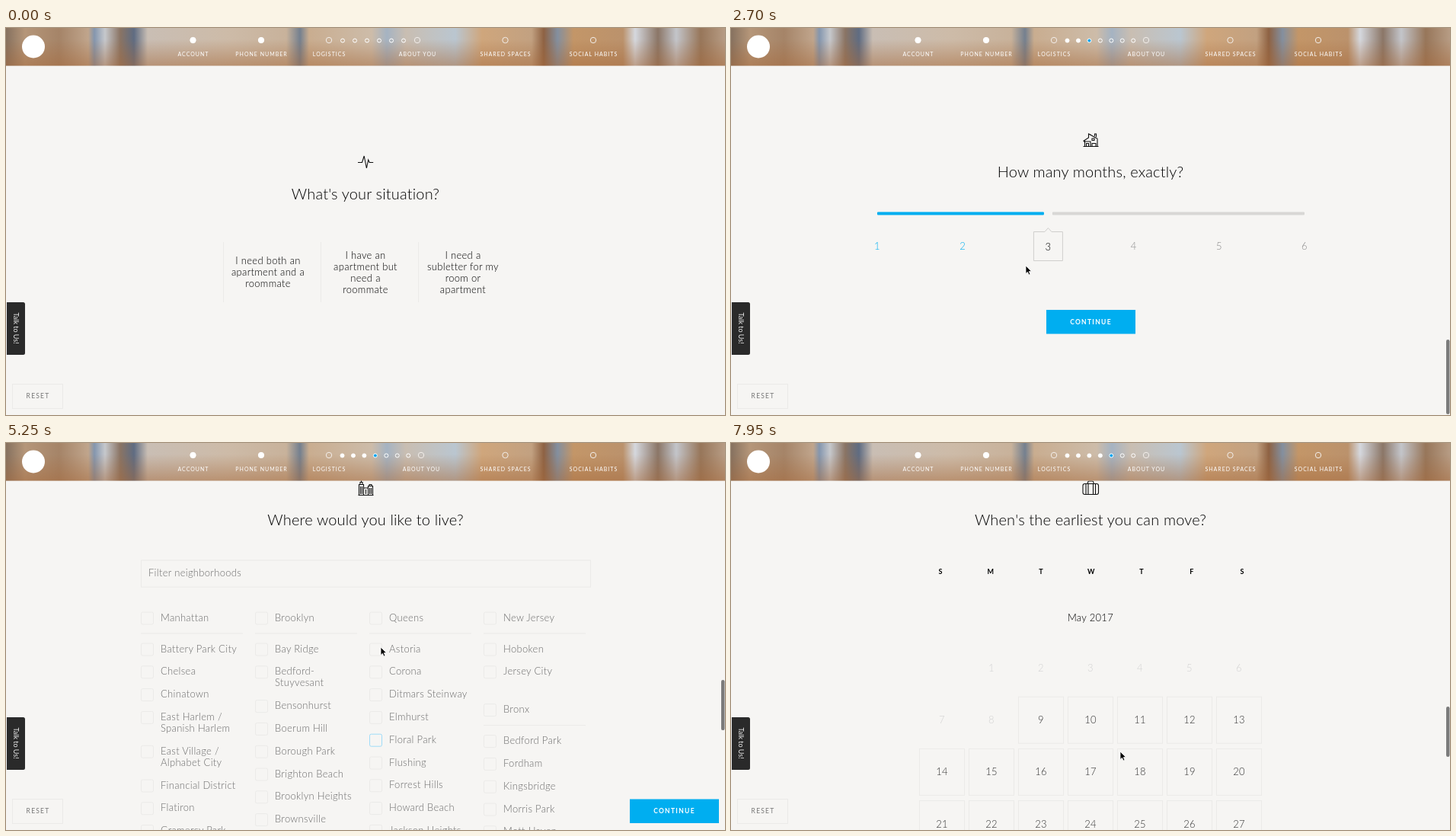
Recreate the animation shown at these times as an HTML page. Size 944x508 px, loop 8 s.

```html
<!DOCTYPE html>
<html lang="en">
<head>
<meta charset="utf-8">
<title>Roommate questionnaire</title>
<style>
  html, body { margin: 0; width: 100%; height: 100%; overflow: hidden; background: #f6f5f3; }
  svg { display: block; width: 944px; height: 508px; }
  text { font: 300 13px Lato, "Open Sans", sans-serif; letter-spacing: .3px; white-space: pre; }
  .mid { text-anchor: middle; }
  .title { font-size: 20px; letter-spacing: .15px; }
  .grey { fill: #6c6c6c; }
  .nav { font-size: 7px; font-weight: 400; letter-spacing: 1px; fill: #fff; }
  .caps { font-size: 8.5px; font-weight: 400; letter-spacing: 1.2px; fill: #777; }
  .btn { font-size: 8.5px; font-weight: 700; letter-spacing: 1.3px; fill: #fff; }
  .week { font-size: 9px; font-weight: 700; }
  .tab { font-size: 9px; font-weight: 400; letter-spacing: 0; fill: #eee; }
  .icon { fill: none; stroke: #111; stroke-width: 1.1; }
</style>
</head>
<body>
<svg id="stage" viewBox="0 0 944 508"></svg>
<script>
const LOOP = 8000, STEP = 150;
const BLUE = '#00aef0', HOVER = '#1cb8fb', LINE = '#ebeae8', PAPER = '#f6f5f3';

const text = (x, y, s, cls = '', extra = '') => `<text x="${x}" y="${y}" class="${cls}" ${extra}>${s}</text>`;
const rect = (x, y, w, h, fill, extra = '') => `<rect x="${x}" y="${y}" width="${w}" height="${h}" fill="${fill}" ${extra}/>`;
const box = (x, y, w, h, stroke = LINE, extra = '') => rect(x + .5, y + .5, w, h, 'none', `stroke="${stroke}" ${extra}`);
const path = (d, extra) => `<path d="${d}" ${extra}/>`;
const circle = (x, y, r, fill, stroke) => `<circle cx="${x}" cy="${y}" r="${r}" fill="${fill}" stroke="${stroke}"/>`;
const list = (n, f) => Array.from({ length: n }, (_, i) => f(i)).join('');
const group = (y, s) => `<g transform="translate(0 ${y.toFixed(1)})">${s}</g>`;

// Eased value between keys of the form [time, ...values]
function at(t, keys) {
  const i = keys.findIndex(k => k[0] > t);
  if (i < 0) return keys.at(-1).slice(1);
  if (!i) return keys[0].slice(1);
  const a = keys[i - 1], b = keys[i], u = (t - a[0]) / (b[0] - a[0]), e = u * u * (3 - 2 * u);
  return a.slice(1).map((v, j) => v + (b[j + 1] - v) * e);
}

const scrollKeys = [[750, -176], [1350, -109], [1800, 72], [1950, 72], [2550, 397], [4350, 397],
  [5100, 757], [5700, 757], [6000, 696], [7500, 696], [7950, 1029]];
const cursorKeys = [[300, 300, 420], [600, 348, 322], [1500, 348, 322], [1800, 387, 312], [2700, 387, 312],
  [3000, 416, 243], [3150, 416, 243], [3750, 641, 243], [4200, 459, 391], [4500, 459, 391], [4950, 486, 388],
  [5100, 486, 388], [5250, 492, 268], [5700, 425, 172], [6600, 425, 172], [6900, 335, 291], [7050, 335, 291],
  [7350, 877, 480], [7500, 877, 480], [7950, 511, 405]];
const thumbKeys = [[1500, 380, 127], [2550, 409, 98], [4350, 409, 98], [4500, 290, 66], [5100, 311, 66],
  [7500, 320, 66], [7950, 346, 66]];
const answerTimes = [900, 2100, 4500, 7650];

const icons = [
  'M462 .5h5.5l2.7-8.5 3.2 16 2.3-11 1.5 3.5h5',
  'M465-9.5h14M465 9.5h14M467-9.5v4q0 3 4 5.500q-4 2.500-4 5.500v4M477-9.500v4q0 3-4 5.500q4 2.500 4 5.500v4M468-3.500h8M468 6l4-3.500 4 3.500',
  'M462.500 1.500l7-4.500v-5l12 6.500M469.500-8l3.500 1.500M479.500-4v-4h-2v3M464.500 1v7.500h16.500v-9.500M462.500 8.500h20M463 2h9v6M466.500 8.500v-4h3v4M473.500 4.500h6M474 8v-3M479 8v-3M474-2h3v2.500h-3z',
  'M463.500 9.500v-14h6v14M465-4.500v-3h3v3M466.500-7.500v-2.500M469.500 0h6v9.500M475.500 9.500v-12h6v12M477-2.500v-2h3v2M462.500 9.500h20M465.500-2v10M467.500-2v10M472.500 2v6M477.500 0v8M479.500 0v8',
  'M464.500-5.500h15.500q2.500 0 2.500 2.500v9q0 2.500-2.500 2.500h-15.500q-2.500 0-2.500-2.500v-9q0-2.500 2.500-2.500zM468.500-5.500v-1.500q0-2 2-2h3.500q2 0 2 2v1.500M466 8v-13.500M469 8v-13.500M475.500 8v-13.500M478.500 8v-13.500'
];
const questions = ["What's your situation?", 'For how long?', 'How many months, exactly?',
  'Where would you like to live?', "When's the earliest you can move?"];
const answers = [['Your situation', 'I need both an apartment and a roommate'], ['How long', 'Short term'],
  ['How many months', '5 months'], ['Neighborhoods', 'Prospect Heights']];

const choices = [
  ['I need both an', 'apartment and a', 'roommate'],
  ['I have an', 'apartment but', 'need a', 'roommate'],
  ['I need a', 'subletter for my', 'room or', 'apartment']
];
// "#" marks a heading, "/" a line break
const areas = [
  '#Manhattan|Battery Park City|Chelsea|Chinatown|East Harlem //Spanish Harlem|East Village //Alphabet City|Financial District|Flatiron|Gramercy Park',
  '#Brooklyn|Bay Ridge|Bedford-/Stuyvesant|Bensonhurst|Boerum Hill|Borough Park|Brighton Beach|Brooklyn Heights|Brownsville',
  '#Queens|Astoria|Corona|Ditmars Steinway|Elmhurst|Floral Park|Flushing|Forrest Hills|Howard Beach|Jackson Heights',
  '#New Jersey|Hoboken|Jersey City|#Bronx|Bedford Park|Fordham|Kingsbridge|Morris Park|Mott Haven'
];

function checkbox(x, y, label, stroke = LINE, ticked = false) {
  const lines = label.includes('//') ? label.replace('//', '/|').split('|') : label.split(/(?<=-)\//);
  return box(x, y - 8, 16, 16, stroke, 'rx="2"') +
    (ticked ? rect(x, y - 8, 17, 17, BLUE, 'rx="2"') + path(`M${x + 4.5} ${y}l3 3 5-6`, 'fill="none" stroke="#fff" stroke-width="1.5"') : '') +
    lines.map((s, i) => text(x + 26, y + 4 + 15 * i, s, 'grey')).join('');
}

function areaColumn(spec, col, t) {
  const x = 177 + 150 * col;
  let y = 170.500, s = '';
  for (const name of spec.split('|')) {
    if (name[0] === '#') {
      if (s) y += 20;
      s += checkbox(x, y, name.slice(1)) + rect(x, y + 20, 134, 1, LINE);
      y += 41;
    } else {
      const lit = name === 'Floral Park' && t >= 5100 && t < 5400;
      s += checkbox(x, y, name, lit ? '#9fdcf8' : LINE);
      y += name.includes('/') ? 44.800 : 29.800;
    }
  }
  return s;
}

const button = (x, y, hot) => rect(x, y, 117, 31.500, hot ? HOVER : BLUE) + text(x + 58.500, y + 18.500, 'CONTINUE', 'btn mid');

const situation = () => choices.map((lines, c) => {
  const x = 344 + 128 * c;
  return rect(x - 59, 105, 1, 79, LINE) +
    lines.map((s, i) => text(x, 149 + 15 * i - 7.500 * (lines.length - 1), s, 'mid')).join('');
}).join('');

const duration = () => ['Short term', 'Long term'].map((s, i) =>
  box(334 + 144 * i, 105, 133, 34) + text(401 + 143 * i, 126, s, 'mid')).join('');

function months(t) {
  const [v] = at(t, [[3150, 3], [3750, 5]]);
  const x = 192 + 112.200 * (v - 1), now = Math.round(v);
  const numbers = list(6, i => i + 1 === now ? '' :
    text(192 + 112.200 * i, 143.500, i + 1, 'mid', `fill="${i + 1 < now ? BLUE : '#888'}"`));
  return rect(192, 94.500, x - 197.500, 4, BLUE, 'rx="1"') + rect(x + 5.500, 94.500, 747.500 - x, 4, '#d8d7d5', 'rx="1"') + numbers +
    path(`M${x - 19} 120.500h14.500l4.500-5 4.500 5h14.500v38h-38z`, `fill="${PAPER}" stroke="#cfcecc"`) +
    text(x, 145, now, 'mid') + button(414, 223, t >= 4200);
}

function places(t) {
  const focus = t >= 5700 && t < 7050, typed = t >= 6000 ? 'Pr' : t >= 5850 ? 'P' : '';
  const field = box(177, 94.500, 590, 35, focus ? '#45b8e8' : LINE) +
    (typed ? text(187, 117, typed) : text(187, 116, 'Filter neighborhoods', 'grey')) +
    (focus ? rect(typed ? 184 + 7.500 * typed.length : 187, 105, 1, 14, '#333') : '');
  return field + (typed
    ? checkbox(327, 171, 'Prospect Heights', LINE, t >= 7050) + checkbox(327, 201, 'Prospect-Lefferts-/Gardens')
    : areas.map((a, i) => areaColumn(a, i, t)).join(''));
}

function calendar() {
  const days = list(31, i => {
    const d = i + 1, x = 277 + 65 * (d % 7), y = 236.500 + 68.200 * Math.floor(d / 7), open = d > 8;
    return (open ? box(x - 30, y - 31, 59, 61) : '') + text(x, y + 4.500, d, 'mid', `fill="${open ? '#333' : '#d2d2d2'}"`);
  });
  return [...'SMTWTFS'].map((c, i) => text(275 + 66 * i, 113, c, 'week mid')).join('') +
    text(472, 175, 'May 2017', 'mid') + days;
}

const bodies = [situation, duration, months, places, calendar];

function section(k, t, step) {
  const icon = path(icons[k], 'class="icon"');
  if (k === step) return icon + text(472, 49, questions[k], 'title mid') + bodies[k](t);
  const [head, answer] = answers[k], w = 8.430 * head.length;
  return icon + text(472, 49, head, 'title mid') + rect(472 - w / 2, 55, w, 1.800, '#2bb3ee') +
    text(472, 88, answer, 'grey mid') + rect(0, 143, 944, 1, '#f1f0ee');
}

// Soft tones of a sunlit stone hall
const tones = [[0, '#86715f'], [25, '#b59679'], [70, '#a58468'], [108, '#c0a58c'], [116, '#8496ae'], [130, '#c6c8cc'],
  [150, '#8a7464'], [168, '#5f6c82'], [186, '#c9beb4'], [290, '#cdbba8'], [368, '#c8b29b'], [386, '#74808f'],
  [398, '#c9ad90'], [480, '#cdbca9'], [500, '#a5b3c2'], [525, '#c9beb2'], [590, '#bac6d0'], [625, '#cfa67c'],
  [690, '#c2a181'], [706, '#8e6243'], [724, '#838f9f'], [745, '#c39668'], [810, '#bb926c'], [826, '#d5d8de'],
  [856, '#8b7667'], [880, '#c3c5ca'], [912, '#97765a'], [944, '#b79c84']];
const defs = `<defs><linearGradient id="hall">${tones.map(([x, c]) =>
  `<stop offset="${x / 944}" stop-color="${c}"/>`).join('')}</linearGradient>
  <linearGradient id="shade" x2="0" y2="1"><stop offset=".3" stop-color="#a5683a" stop-opacity="0"/>
  <stop offset="1" stop-color="#a5683a" stop-opacity=".5"/></linearGradient></defs>`;

const labels = ['ACCOUNT', 'PHONE NUMBER', 'LOGISTICS', 'ABOUT YOU', 'SHARED SPACES', 'SOCIAL HABITS'];
const layouts = [
  { xs: [245.500, 335, 424, 540, 655.500, 771], first: 442, gap: 16, count: 6 },
  { xs: [245.500, 336, 426, 542.500, 653.500, 770], first: 444, gap: 16.100, count: 6 },
  { xs: [245.500, 335, 424, 545, 655.500, 771], first: 441.500, gap: 14.450, count: 7 }
];

function header(step) {
  const { xs, first, gap, count } = layouts[Math.min(step, 2)];
  const dots = list(count, i => {
    const done = step && i < step, now = step && i === step;
    return circle(first + gap * i, 16.500, 2.500, done ? '#fff' : now ? '#0aa5ee' : 'none', '#fff');
  });
  return rect(0, 0, 944, 49.500, 'url(#hall)') + rect(0, 0, 944, 49.500, 'url(#shade)') +
    circle(36, 24.500, 15, '#fff', 'none') + dots +
    xs.map((x, i) => circle(x, 16, 3.700, i < 2 ? '#fff' : 'none', i < 2 ? '#fff' : '#f3eeea') +
      text(x + .5, 37, labels[i], 'nav mid')).join('');
}

const fixed = box(8, 467, 66, 32) + text(42, 486, 'RESET', 'caps mid') +
  path('M1 360h21.500q2.500 0 2.500 2.500v64q0 2.500-2.500 2.500h-21.500z', 'fill="#2a2a2a"') +
  text(0, 0, 'Talk to Us!', 'tab', 'transform="translate(10 373.500) rotate(90)"');

function pointer(t) {
  if (t < 300) return '';
  const [x, y] = at(t, cursorKeys);
  return path('M0 0V10.500L2.400 8.300 4.100 12 5.900 11.200 4.300 7.600H7.500Z',
    `transform="translate(${x} ${y})" stroke="#fff" stroke-width=".8"`);
}

function thumb(t) {
  if (t < 1500 || (t >= 5850 && t < 7650)) return '';
  const [y, h] = at(t, thumbKeys);
  return rect(939, y, 4.500, h, '#7b7b7b', 'rx="2.2"');
}

function draw(t) {
  const step = answerTimes.filter(a => t >= a).length;
  const [scroll] = at(t, scrollKeys);
  return defs + list(step + 1, k => group(272 * k - scroll, section(k, t, step))) + header(step) + fixed +
    (step === 3 && t >= 4800 ? button(819, 467.500, t >= 7350) : '') + thumb(t) + pointer(t);
}

const stage = document.getElementById('stage');
let shown = -1;
function tick(now) {
  const t = Math.floor(now % LOOP / STEP) * STEP;
  if (t !== shown) stage.innerHTML = draw(shown = t);
  requestAnimationFrame(tick);
}
tick(performance.now());
</script>
</body>
</html>
```
